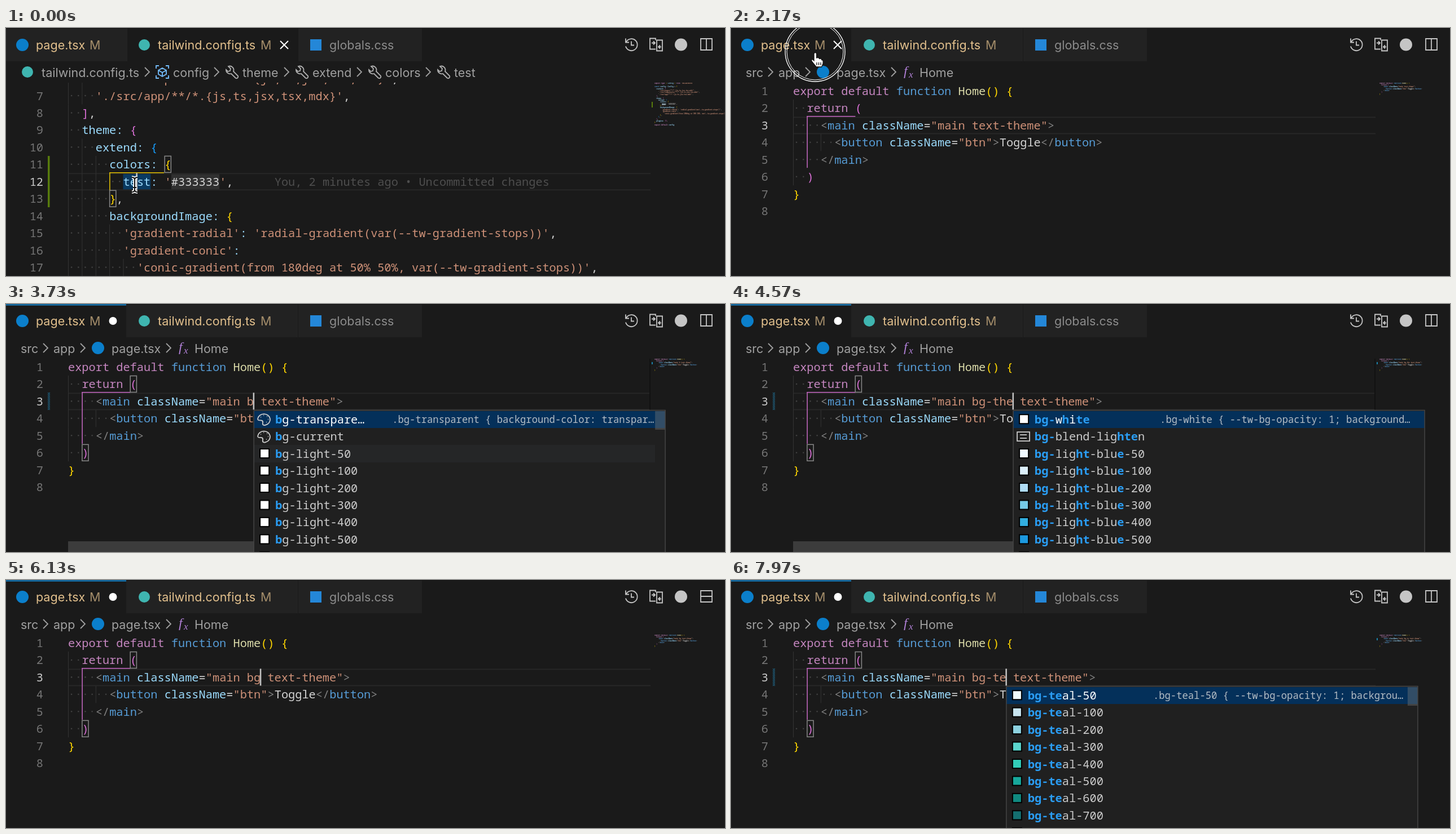
Animation, 1274 px wide and 440 px high, one loop 8 s. Source, as an HTML page with a canvas:

```html
<!DOCTYPE html>
<html lang="en">
<head>
<meta charset="utf-8">
<title>Editor animation</title>
<style>
html, body { margin: 0; width: 100%; height: 100%; overflow: hidden; background: #1a1a1a; }
canvas { display: block; }
</style>
</head>
<body>
<canvas id="stage" width="1274" height="440"></canvas>
<script>
const ctx = document.getElementById("stage").getContext("2d");
const LOOP = 8000, LEFT = 110, CHAR = 12.19, LINE = 30.45, SIZE = CHAR / 0.6;
const MONO = '"Noto Sans Mono", "DejaVu Sans Mono", monospace';
const UI = "21.5px Inter, Roboto, sans-serif";
const BG = "#1a1a1a", REACT = "#0b7fcb", TEAL = "#3fb5b0", GOLD = "#e2c08d";

// Each "~x" in a code line switches to the colour named x.
const COLORS = {
  k: "#c586c0", t: "#569cd6", a: "#9cdcfe", s: "#ce9178", g: "#808080",
  f: "#dcdcaa", w: "#d4d4d4", y: "#ffd700", p: "#da70d6", b: "#179fff"
};
const GLOB = "/**/*.{js,ts,jsx,tsx,mdx}'~w,";
const CONFIG = [
  "~kimport type ~y{ ~aConfig ~y} ~kfrom ~s'tailwindcss'",
  "",
  "~tconst ~aconfig: Config ~w= ~y{",
  "  ~acontent: ~p[",
  "    ~s'./src/pages" + GLOB,
  "    ~s'./src/components" + GLOB,
  "    ~s'./src/app" + GLOB,
  "  ~p]~w,",
  "  ~atheme: ~p{",
  "    ~aextend: ~b{",
  "      ~acolors: ~y{",
  "        ~atest: ~s'~w#333333~s'~w,",
  "      ~y}~w,",
  "      ~abackgroundImage: ~y{",
  "        ~s'gradient-radial'~a: ~s'radial-gradient(var(--tw-gradient-stops))'~w,",
  "        ~s'gradient-conic'~a:",
  "          ~s'conic-gradient(from 180deg at 50% 50%, var(--tw-gradient-stops))'~w,",
  "      ~y}~w,", "    ~b}~w,", "  ~p}~w,",
  "  ~aplugins: ~p[]~w,", "~y}", "~kexport default ~aconfig"
];
const page = typed => [
  "~kexport default ~tfunction ~fHome~y() {",
  "  ~kreturn ~p(",
  `    ~g<~tmain ~aclassName~w=~s"main${typed} text-theme"~g>`,
  '      ~g<~tbutton ~aclassName~w=~s"btn"~g>~wToggle~g</~tbutton~g>',
  "    ~g</~tmain~g>", "  ~p)", "~y}", ""
];

const SWITCH = 2120, FOCUS = 2950;
const KEYS = [
  [0, ""], [3450, " "], [3620, " b"], [3950, " bg"], [4130, " bg-"], [4260, " bg-t"],
  [4400, " bg-th"], [4530, " bg-the"], [5060, " bg-them"], [5250, " bg-theme"],
  [5800, " bg-"], [6000, " bg"], [6800, " bg-"], [7150, " bg-t"], [7600, " bg-te"]
];
const MOUSE = [
  [0, 228, 278], [950, 228, 278], [1200, 274, 290], [1450, 280, 290],
  [1980, 149, 46], [2400, 149, 46], [2880, 416, 178], [3450, 416, 178]
];
const SHADES = [50, 100, 200, 300, 400, 500, 600, 700, 800];
const SKY = ["#f0f9ff", "#dceffa", "#afdcf4", "#75cae6", "#32afe0", "#1c99df", "#1480be"];
const AQUA = ["#f2fbfb", "#c8e4ef", "#8dd2e0", "#5bd5cd", "#32cdb9", "#17a89b", "#108a80", "#146f70", "#155e5d"];

const ICONS = {
  wrench: "M-10,-4a7 7 0 0 0 9 7l8 8a3 3 0 0 0 4,-4l-8,-8a7 7 0 0 0 -9,-9l4,4 -1,4 -4,1z",
  cube: "M0,-7L7,-3V4L0,8L-7,4V-3ZM-7,-3L0,1L7,-3M0,1V8M-11,-6V-11H-6M6,-11H11V-6M11,6V11H6M-6,11H-11V6",
  chevron: "M-4,-8L4,0L-4,8",
  history: "M-9,-5A10.5 10.5 0 1 1 -10,3M-10,-11V-4H-4M0,-6V1H5",
  diff: "M-1,8H-11V-11H-1V-8M1,-8H11V11H1ZM-8,-3H-2M-5,-6L-2,-3L-5,0M9,4H4M7,1L4,4L7,7",
  columns: "M-10,-10H10V10H-10ZM0,-10V10",
  rows: "M-10,-10H10V10H-10ZM-10,0H10",
  close: "M-7,-7L7,7M7,-7L-7,7",
  palette: "M-1,10C-5,8 1,4 -4,2C-8,1 -11,3 -11,-1A11 10 0 1 1 3,10Q0,11 -1,10Z" +
    "M-6,-4h1M-1,-7h1M5,-5h1M7,0h1M4,5h1",
  lines: "M-11,-8H11V8H-11ZM-6,-3H6M-6,3H6",
  beam: "M-5,-13Q0,-13 0,-9V9Q0,13 -5,13M5,-13Q0,-13 0,-9V9Q0,13 5,13M-3,5H3",
  hand: "M-2,0a2.3 2.3 0 0 1 4.6,0V7q4,-1 5,1.5q4,-1 4,2q3,0 2.5,4V17l-2.5,6H2L-6,13q-1,-4 2,-3l2,2Z" +
    "M3,15v5M6.5,15v5M10,15v5"
};

function box(x, y, w, h, color) {
  ctx.fillStyle = color;
  ctx.fillRect(x, y, w, h);
}
function frame(x, y, w, h, color) {
  ctx.strokeStyle = color;
  ctx.lineWidth = 1.5;
  ctx.strokeRect(x, y, w, h);
}
function disc(x, y, r, color) {
  ctx.fillStyle = color;
  ctx.beginPath();
  ctx.arc(x, y, r, 0, 7);
  ctx.fill();
}
function ring(x, y, r, width) {
  ctx.strokeStyle = "#fff";
  ctx.lineWidth = width;
  ctx.beginPath();
  ctx.arc(x, y, r, 0, 7);
  ctx.stroke();
}
function icon(name, x, y, color, width = 1.8, fill) {
  const path = new Path2D(ICONS[name]);
  ctx.save();
  ctx.translate(x, y);
  if (fill) { ctx.fillStyle = fill; ctx.fill(path); }
  ctx.strokeStyle = color;
  ctx.lineWidth = width;
  ctx.stroke(path);
  ctx.restore();
}
function text(str, x, y, color, font = UI) {
  ctx.font = font;
  ctx.fillStyle = color;
  ctx.fillText(str, x, y);
}
const mono = (size = SIZE, weight = "") => `${weight} ${size}px ${MONO}`;
const col = n => LEFT + n * CHAR;

function code(src, x, y, size, weight) {
  const [pad, ...tokens] = src.split("~"), step = size * 0.6;
  x += pad.length * step;
  for (const tok of tokens) {
    text(tok.slice(1), x, y, COLORS[tok[0]], mono(size, weight));
    x += (tok.length - 1) * step;
  }
}

function indent(src, mid) {
  const depth = src.split("~")[0].length;
  for (let i = 0; i < depth; i++) {
    if (i % 2 == 0) box(col(i), mid - 15, 1, LINE, "#343434");
    disc(col(i + 0.5), mid, 1.3, "#414141");
  }
}

function editor(lines, first, top, current) {
  const midOf = n => top + (n - 1) * LINE;
  for (const edge of [-15, 14]) box(LEFT, midOf(current) + edge, 1032, 2, "#272727");
  lines.forEach((src, i) => {
    const n = i + 1, mid = midOf(n);
    if (n < first || mid > 460) return;
    indent(src, mid);
    ctx.textAlign = "right";
    text(n, 66, mid + 7.5, n == current ? "#cccccc" : "#757575", mono());
    ctx.textAlign = "left";
    code(src, LEFT, mid + 7.5, SIZE);
  });
}

function minimap(lines) {
  ctx.globalAlpha = 0.85;
  lines.forEach((src, i) => code(src, 1149, 98.5 + i * 3.38, 2.8, "bold"));
  ctx.globalAlpha = 1;
}

function pairGuide(x, y, w, h, color) {
  box(x, y, w, 1.5, color);
  box(x, y, 1.5, h, color);
}
const bracketBox = (column, mid) => frame(col(column) + 0.5, mid - 14.5, CHAR - 1, 29, "#888");
const caret = (column, mid) => box(col(column) - 1.5, mid - 15, 2.5, 30, "#c4c4c4");
const blink = (t, start) => (t - start) % 1000 < 500;

function configView(t) {
  const mid = 272.3;
  box(col(8), mid - 15, CHAR * 4, 30, "#0a3a61");
  box(col(15), mid - 13, CHAR * 7, 27, "#303030");
  editor(CONFIG, 6, 120 - 6 * LINE, 12);
  text("You, 2 minutes ago • Uncommitted changes", col(30), mid + 7.5, "#4e4e4e", mono());
  pairGuide(col(6), 256, 97, 32, "#e6c200");
  bracketBox(14, 241.8);
  bracketBox(6, 302.7);
  box(74, 227, 3.5, 91, "#587c0c");
  if (blink(t, 0)) caret(10, mid);
  box(1162, 134, 7, 3, "#777");
  box(1144, 131, 2, 10, "#587c0c");
  minimap(CONFIG);
}

function changeBar() {
  ctx.save();
  ctx.beginPath();
  ctx.rect(74, 157, 4, 31);
  ctx.clip();
  ctx.strokeStyle = "#20698a";
  ctx.lineWidth = 1.2;
  ctx.beginPath();
  for (let y = 156; y < 196; y += 3) { ctx.moveTo(73, y); ctx.lineTo(79, y - 6); }
  ctx.stroke();
  ctx.restore();
  box(1144, 103, 2, 4, "#1b81a8");
}

function pageView(t, typed) {
  const lines = page(typed), mid = 172.4;
  editor(lines, 1, 111.5, 3);
  pairGuide(col(2), 156, 86, 92, "#c566c2");
  if (t > FOCUS) {
    bracketBox(9, 142);
    bracketBox(2, 263.8);
  }
  if (t > 3470 && t < 5950 || t > 6850) changeBar();
  const lastKey = KEYS.findLast(k => k[0] <= t)[0];
  if (t > FOCUS && blink(t, Math.max(FOCUS, lastKey))) caret(25 + typed.length, mid);
  minimap(lines);
  // scrollbar and minimap edge fade together
  ctx.globalAlpha = Math.max(0, Math.min(1, (t - 3400) / 150, (5800 - t) / 250));
  box(LEFT, 421, 1000, 19, "#3c3c3c");
  box(1140, 97, 2, 343, "#121212");
  ctx.globalAlpha = 1;
}

// Suggestion rows are [icon or swatch colour, label]; stars enclose matched letters.
function suggestions(word) {
  const mark = name => `*${name.slice(0, word.length)}*${name.slice(word.length)}`;
  const teal = SHADES.map((s, i) => [AQUA[i], mark("bg-teal-" + s)]);
  const clear = ["palette", mark("bg-transpare…")];
  const clearCss = [245, ".bg-transparent { background-color: transpar…"];
  if (word.startsWith("bg-th")) return {
    css: [260, ".bg-white { --tw-bg-opacity: 1; background…"],
    rows: [["#fff", "*bg-*w*h*i*te*"], ["lines", "*bg-*blend-lig*hte*n"],
      ...SKY.map((c, i) => [c, "*bg-*lig*ht*-blu*e*-" + SHADES[i]])]
  };
  if (word == "bg-te") return { thumb: true, css: [260, ".bg-teal-50 { --tw-bg-opacity: 1; backgrou…"], rows: teal };
  if (word == "bg-t") return { thumb: true, css: clearCss, rows: [clear, ...teal.slice(0, 8)] };
  return {
    thumb: true, css: clearCss, hover: 2,
    rows: [clear, ["palette", mark("bg-current")],
      ...SHADES.slice(0, 7).map(s => ["#fff", mark("bg-light-" + s)])]
  };
}

function popup(word) {
  const x = col(26 + word.length), { css, rows, hover, thumb } = suggestions(word);
  box(x, 188, 729, 260, "#202020");
  box(x, 190, 729, 30, "#04305a");
  if (hover) box(x, 250, 711, 31, "#252627");
  if (thumb) box(x + 711, 190, 18, 33, "rgba(121,121,121,.4)");
  frame(x, 188.5, 729, 260, "#454545");
  rows.forEach(([kind, label], i) => {
    const mid = 204.2 + i * 30.45;
    if (ICONS[kind]) icon(kind, x + 18, mid + 0.5, "#cccccc");
    else {
      box(x + 10, mid - 9, 18, 18, "#000");
      box(x + 12, mid - 7, 14, 14, kind);
    }
    let tx = x + 38;
    label.split("*").forEach((part, j) => {
      const hit = j % 2;
      text(part, tx, mid + 7.5, hit ? "#2a9df4" : i ? "#cccccc" : "#fff", mono(SIZE, hit ? "bold" : ""));
      tx += part.length * CHAR;
    });
  });
  text(css[1], x + css[0], 210.5, "#b4bcc4", mono(17.2));
}

function crumbs(items) {
  for (const [x, label, kind] of items) {
    if (kind == "wrench") icon(kind, x - 19, 78, "#b0b0b0");
    if (kind == "cube") icon(kind, x - 19, 78, "#75beff");
    text(label, x, 86.5, "#a0a0a0");
  }
}

function header(t, onPage, typed) {
  box(0, 0, 1274, 97, BG);
  if (onPage) box(213, 0, 304, 59, "#222");
  else box(0, 0, 215, 59, "#222");
  box(518, 0, 219, 59, "#222");
  box(0, 0, 1274, 1, "#101010");
  if (onPage && t > 2560) box(0, 0.5, 213, 2, "#1384cc");
  disc(29, 30, 11, REACT);
  disc(245, 30, 10, TEAL);
  box(539, 20, 20, 20, "#2487d8");
  text("page.tsx", 53, 38, GOLD);
  text("M", 148, 38, "#a58e6b");
  text("tailwind.config.ts", 269, 38, GOLD);
  text("M", 451, 38, "#a58e6b");
  text("globals.css", 573, 38, "#8c8c8c");
  if (typed) disc(189.5, 30, 7, "#fff");
  else icon("close", onPage ? 189 : 493, 30, "#fff", 2);

  icon("history", 1108, 29.5, "#c5c5c5");
  icon("diff", 1152, 29.5, "#c5c5c5");
  disc(1196, 29.5, 11, "#c5c5c5");
  icon(t > 5550 && t < 6350 ? "rows" : "columns", 1241, 29, "#c5c5c5");

  if (onPage) {
    crumbs([[26, "src"], [84, "app"], [187, "page.tsx"], [334, "Home"]]);
    disc(163, 78, 11, REACT);
    text("f", 306, 84, "#b180d7", 'italic 24px "Liberation Serif", serif');
    text("x", 315, 88, "#b180d7", 'italic 17px "Liberation Serif", serif');
  } else {
    crumbs([[63, "tailwind.config.ts"], [296, "config", "cube"], [419, "theme", "wrench"],
      [543, "extend", "wrench"], [672, "colors", "wrench"], [794, "test", "wrench"]]);
    disc(38, 78, 10, TEAL);
  }
  for (const x of onPage ? [70, 136, 288] : [250, 373, 497, 626, 748]) icon("chevron", x, 78, "#a0a0a0");
}

function pointer(t) {
  if (t >= 3450) return;
  const i = MOUSE.findLastIndex(m => m[0] <= t);
  const [t0, x0, y0] = MOUSE[i], [t1, x1, y1] = MOUSE[i + 1];
  const u = (t - t0) / (t1 - t0), e = u * u * (3 - 2 * u);
  const x = x0 + (x1 - x0) * e, y = y0 + (y1 - y0) * e;
  if (y < 97) icon("hand", x, y, "#111", 1.3, "#fff");
  else {
    icon("beam", x, y, "#fff", 5.5);
    icon("beam", x, y, "#111", 2);
  }
  const pressed = t > 2060 && t < 2360 || t > 2900 && t < 3150;
  if (pressed) {
    ring(x, y - 4, 53, 1.3);
    ring(x, y - 4, 50, 1);
  }
}

function draw(t) {
  const onPage = t >= SWITCH, typed = KEYS.findLast(k => k[0] <= t)[1];
  box(0, 0, 1274, 440, BG);
  if (onPage) pageView(t, typed);
  else configView(t);
  header(t, onPage, typed);
  if (t >= 3620 && t < 5060 || t >= 6800) popup(typed.trim());
  pointer(t);
}

const start = performance.now();
function tick() {
  draw((performance.now() - start) % LOOP);
  requestAnimationFrame(tick);
}
tick();
</script>
</body>
</html>
```
